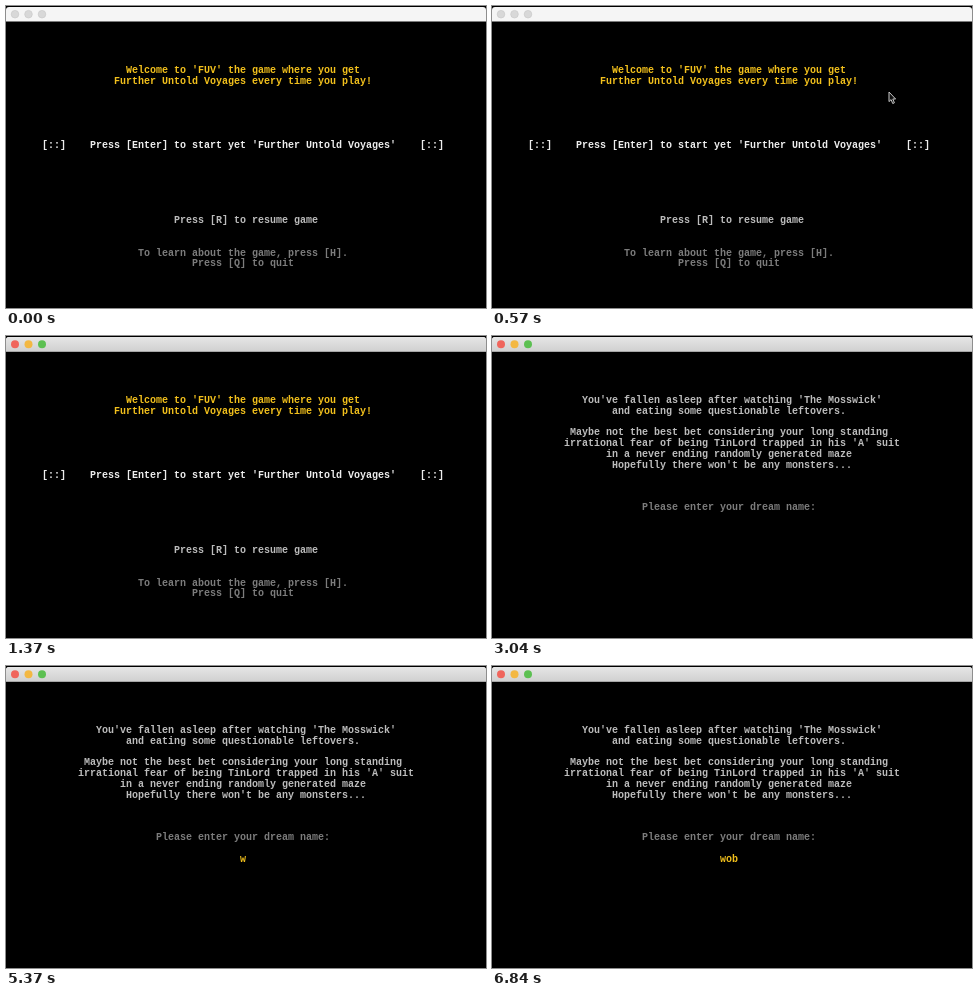
These frames come from a looping animation (480x302 px, 8 s). An HTML page:

```html
<!DOCTYPE html>
<html lang="en">
<head>
<meta charset="utf-8">
<title>Maze game in a terminal</title>
<style>
  html, body { margin: 0; width: 100%; height: 100%; overflow: hidden; background: #000; }
  svg { display: block; width: 480px; height: 302px; }
  text { font: bold 10px "Liberation Mono", "DejaVu Sans Mono", monospace; white-space: pre; }
  .gold { fill: #f2c01c; }
  .white { fill: #ededed; }
  .light { fill: #bcbcbc; }
  .grey { fill: #7c7c7c; }
  .timed { animation: 8s step-end infinite; visibility: hidden; }
  #home { animation-name: home; }
  #dream { animation-name: dream; }
  #active { animation-name: active; }
  #pointer { animation-name: pointer; }
  #name1 { animation-name: name1; }
  #name2 { animation-name: name2; }
  #name3 { animation-name: name3; }
  @keyframes home { 0% { visibility: visible } 38%, 100% { visibility: hidden } }
  @keyframes dream { 0% { visibility: hidden } 38%, 100% { visibility: visible } }
  @keyframes active { 0% { visibility: hidden } 13%, 100% { visibility: visible } }
  @keyframes pointer {
    0% { visibility: hidden; transform: translate(420px, 89px) }
    6.25% { visibility: visible; transform: translate(420px, 89px) }
    7.125% { visibility: visible; transform: translate(397px, 86px) }
    16.25% { visibility: visible; transform: translate(422px, 86px) }
    17.125%, 100% { visibility: hidden; transform: translate(422px, 86px) }
  }
  @keyframes name1 { 0% { visibility: hidden } 67.125% { visibility: visible } 73%, 100% { visibility: hidden } }
  @keyframes name2 { 0% { visibility: hidden } 73% { visibility: visible } 83%, 100% { visibility: hidden } }
  @keyframes name3 { 0% { visibility: hidden } 83%, 100% { visibility: visible } }
</style>
</head>
<body>
<svg viewBox="0 0 480 302">
  <defs>
    <linearGradient id="shade" x2="0" y2="1">
      <stop stop-color="#e6e6e6"/>
      <stop offset="1" stop-color="#d0d0d0"/>
    </linearGradient>
    <path id="bar" d="M0 15.6V4Q0 1 3 1H477Q480 1 480 4V15.6Z"/>
  </defs>
  <rect width="480" height="302"/>
  <use href="#bar" fill="#f5f5f5"/>
  <g fill="#d8d8d8" stroke="#c6c6c6" stroke-width=".6">
    <circle cx="9" cy="8.2" r="3.8"/>
    <circle cx="22.5" cy="8.2" r="3.8"/>
    <circle cx="36" cy="8.2" r="3.8"/>
  </g>
  <g id="active" class="timed">
    <use href="#bar" fill="url(#shade)"/>
    <circle cx="9" cy="8.2" r="4" fill="#f0655c"/>
    <circle cx="22.5" cy="8.2" r="4" fill="#f3b843"/>
    <circle cx="36" cy="8.2" r="4" fill="#5cc052"/>
  </g>
  <g id="home" class="timed"></g>
  <g id="dream" class="timed"></g>
  <g id="names"></g>
  <path id="pointer" class="timed" d="M0 0V9.6L2.1 7.6L3.7 11.5L5.4 10.8L3.8 7H6.6Z"
        fill="#111" stroke="#c8c8c8" stroke-width="1"/>
</svg>
<script>
  const CELL = 6, ROW = 10.72, BASE = 24.4;

  // Centres a line on the 80-column character grid.
  function line(parent, row, style, str) {
    const el = document.createElementNS("http://www.w3.org/2000/svg", "text");
    el.setAttribute("x", (40 - Math.ceil(str.length / 2)) * CELL);
    el.setAttribute("y", BASE + row * ROW);
    el.setAttribute("class", style);
    el.textContent = str;
    document.getElementById(parent).append(el);
    return el;
  }

  line("home", 4, "gold", "Welcome to 'FUV' the game where you get");
  line("home", 5, "gold", "Further Untold Voyages every time you play!");
  line("home", 11, "white", "[::]    Press [Enter] to start yet 'Further Untold Voyages'    [::]");
  line("home", 18, "light", "Press [R] to resume game");
  line("home", 21, "grey", "To learn about the game, press [H].");
  line("home", 22, "grey", "Press [Q] to quit");

  line("dream", 4, "light", "You've fallen asleep after watching 'The Mosswick'");
  line("dream", 5, "light", "and eating some questionable leftovers.");
  line("dream", 7, "light", "Maybe not the best bet considering your long standing");
  line("dream", 8, "light", "irrational fear of being TinLord trapped in his 'A' suit");
  line("dream", 9, "light", "in a never ending randomly generated maze");
  line("dream", 10, "light", "Hopefully there won't be any monsters...");
  line("dream", 14, "grey", "Please enter your dream name:");

  for (let n = 1; n <= 3; n++) {
    line("names", 16, "gold timed", "wob".slice(0, n)).id = "name" + n;
  }
</script>
</body>
</html>
```
